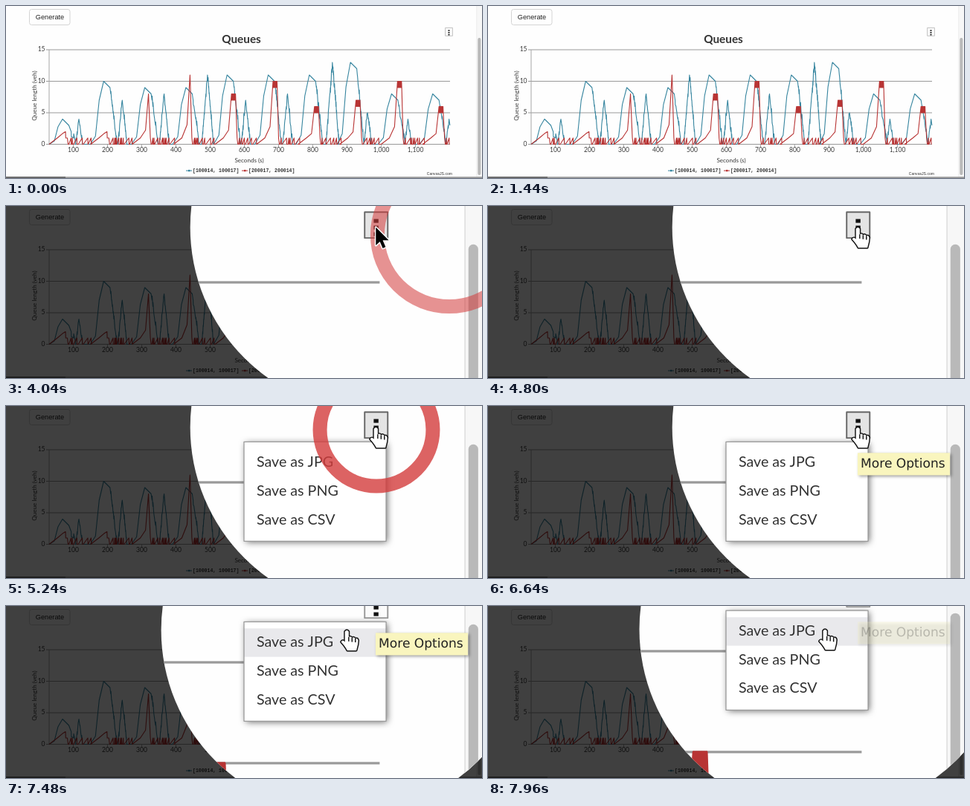
Recreate the animation shown at these times as an HTML page with a canvas. Size 640 px wide and 232 px high, loop 8000 ms.

```html
<!DOCTYPE html>
<html lang="en">
<head>
<meta charset="utf-8">
<title>Queues</title>
<style>
html, body { margin: 0; width: 100%; height: 100%; overflow: hidden; background: #fff; }
canvas { display: block; }
</style>
</head>
<body>
<canvas id="stage" width="640" height="232"></canvas>
<script>
const ctx = document.getElementById('stage').getContext('2d');
const LOOP = 8000, ZOOM = 3.2, RIGHT = 597;
const SANS = 'Lato, "Open Sans", sans-serif';
const BLUE = '#36859f', RED = '#b83434';
const clamp = v => Math.max(0, Math.min(1, v));
const smooth = p => p * p * (3 - 2 * p);
const level = v => 186.5 - v * 8.5;

let seed = 7;
const rnd = () => (seed = seed * 16807 % 2147483647) / 2147483647;

// Peak queue lengths per traffic light cycle
const crests = [4, 10, 9, 9, 11, 11, 11, 13, 8, 8];
const echoes = [4, 7, 8, 11, 7, 8, 13, 5, 4, 4];
const spikes = [2, 2, 8, 11, 8, 10, 6, 7, 10, 6];

// Uneven run from the last point to (x1, v1), one vehicle per step
function jag(points, x1, v1) {
  const [x0, v0] = points[points.length - 1], n = Math.abs(v1 - v0);
  for (let i = 1; i < n; i++) {
    const x = x0 + (x1 - x0) * i / n, v = v0 + (v1 - v0) * i / n;
    points.push([x, v], [x + .2, Math.max(0, v + rnd() * 1.6 - .8)]);
  }
  points.push([x1, v1]);
}

// Each cycle: a steep crest with a sloping shoulder, then a short jagged echo
function bluePoints() {
  const points = [];
  crests.forEach((h, i) => {
    const x = 76 + 55.3 * i, echo = echoes[i], mid = x + 18 + echo, half = 3 + echo * .45;
    points.push([x - 18, 0], [x - 11, h * .13], [x - 6, h * .7], [x, h], [x + 8.5, h - 1]);
    jag(points, x + 18, 0);
    points.push([mid - half, 0]);
    jag(points, mid, echo);
    jag(points, mid + half, 0);
  });
  return points;
}

// Each cycle: a slow ramp, a spike or flickering plateau, then small sawteeth
function redPoints() {
  const points = [];
  spikes.forEach((h, i) => {
    const x = 80 + 55.8 * i, end = i > 3 ? x + 5.5 : x + .5;
    points.push([x - 22, 0], [x - 11, 1], [x - 4, Math.max(1.7, h * .28)], [x, h]);
    for (let b = x; b < end; b += .6) points.push([b, h], [b + .3, h - 1]);
    points.push([end + 2, 1], [end + 3, 0]);
    for (let saw = end + 4; saw < x + 31;) {
      const top = saw + .5 + rnd() ** 2 * 6;
      points.push([saw, 0], [top, 1], [top + .2, 0]);
      saw = top + .4 + rnd() * 1.5;
    }
  });
  return points;
}

function toPath(points) {
  const path = new Path2D();
  points.filter(([x]) => x <= RIGHT).forEach(([x, v]) => path.lineTo(x, level(v)));
  return path;
}
const bluePath = toPath(bluePoints()), redPath = toPath(redPoints());
const arrow = new Path2D('M0 0V7.6L1.7 6 2.9 8.8 4.1 8.3 2.9 5.5H5.4Z');
const hand = new Path2D('M-.8.6Q0-.4.8.6V3Q1.6 2.4 2.2 3.3 3 2.7 3.6 3.6 4.6 3.2 4.8 4.4L4.6 6.2 4 8.6H.2Q-.6 7-2.4 5-1.8 3.8-.8 5Z');
const knuckles = new Path2D('M.8 3V4.8M2.2 3.3V5M3.6 3.6V5.2');

function box(x, y, w, h, color) {
  ctx.fillStyle = color;
  ctx.fillRect(x, y, w, h);
}
function text(str, x, y, font, align = 'center', color = '#3a3a3a') {
  ctx.font = font;
  ctx.textAlign = align;
  ctx.textBaseline = 'middle';
  ctx.fillStyle = color;
  ctx.fillText(str, x, y);
}
function stroke(path, color, width) {
  ctx.strokeStyle = color;
  ctx.lineWidth = width;
  ctx.stroke(path);
}
function rounded(x, y, w, h, r) {
  const path = new Path2D();
  path.roundRect(x, y, w, h, r);
  return path;
}
function shadowBox(x, y, w, h, color, blur, alpha) {
  ctx.save();
  ctx.shadowColor = `rgba(0,0,0,${alpha})`;
  ctx.shadowBlur = blur;
  ctx.shadowOffsetX = ctx.shadowOffsetY = 2;
  box(x, y, w, h, color);
  ctx.restore();
}

// Position along [time, x, y] keys, eased within each span
function track(t, keys) {
  let i = 0;
  while (i < keys.length - 2 && t >= keys[i + 1][0]) i++;
  const [a, b] = [keys[i], keys[i + 1]];
  const p = smooth(clamp((t - a[0]) / (b[0] - a[0])));
  return [a[1] + (b[1] - a[1]) * p, a[2] + (b[2] - a[2]) * p];
}
const cursorAt = t => track(t, [
  [1430, 500, -9.5], [1820, 527.5, 32.5], [2100, 527.5, 32.5], [2930, 594, 38],
  [3060, 595.4, 35.8], [6780, 595.4, 35.8], [7480, 583.2, 45.4], [7960, 581.6, 49.8]
]);

// Zoom about a point on the right edge, then pan down with the cursor
function viewAt(t) {
  const grow = smooth(clamp((t - 3500) / 500));
  const k = 1 + (ZOOM - 1) * grow;
  const p = clamp((t - 6800) / 1250);
  const pan = 44.5 * p * (1.25 - .25 * p);
  return { grow, k, left: 640 * (1 - k), top: 39 * (1 - k) - pan };
}

function drawLegend(label, x, color) {
  box(x, 221.6, 8, 1, color);
  box(x + 3, 220.9, 2.4, 2.4, color);
  text(label, x + 9, 222.6, 'bold 6.5px "Liberation Mono", monospace', 'left', '#333');
}

function drawChart() {
  text('Queues', 316.5, 45, `bold 15.3px ${SANS}`, 'center', '#333');
  for (let v = 0; v <= 15; v += 5) {
    box(54, level(v) - .5, 543, 1, '#999');
    text(v, 52.5, level(v) - .3, `8.5px ${SANS}`, 'right');
  }
  box(57.5, 59, 1, 128, '#a5a5a5');
  for (let v = 100; v <= 1100; v += 100) {
    const x = 44.5 + v * .46;
    box(x - .5, 187, 1, 4, '#a5a5a5');
    text(v.toLocaleString('en-US'), x, 194.7, `8.5px ${SANS}`);
  }
  text('Seconds (s)', 327, 208.2, `8.1px ${SANS}`);
  ctx.save();
  ctx.translate(39, 121);
  ctx.rotate(-Math.PI / 2);
  text('Queue length (veh)', 0, 0, `8.1px ${SANS}`);
  ctx.restore();
  ctx.lineJoin = 'round';
  stroke(bluePath, BLUE, 1.1);
  stroke(redPath, RED, 1.1);
  drawLegend('[100014, 100017]', 242, BLUE);
  drawLegend('[200017, 200014]', 317, RED);
  text('CanvasJS.com', 600, 227, '5.1px "Liberation Sans", sans-serif', 'right', '#333');
}

function drawMenu(hovered) {
  shadowBox(540, 41.9, 59.7, 41.9, '#fff', 9, .6);
  if (hovered) box(540, 44.7, 59.7, 12, '#e9e9ec');
  stroke(rounded(540, 41.9, 59.7, 41.9, 0), '#999', .4);
  ['JPG', 'PNG', 'CSV'].forEach((type, i) =>
    text('Save as ' + type, 545.3, 50.6 + i * 12.1, `6.15px ${SANS}`, 'left', '#333'));
}

function drawTooltip(alpha) {
  ctx.globalAlpha = alpha;
  shadowBox(595.3, 46.6, 38.8, 9.4, '#f9f5be', 4, .4);
  text('More Options', 596.6, 51.4, '5.34px "DejaVu Sans", sans-serif', 'left', '#222');
  ctx.globalAlpha = 1;
}

function drawScene(t) {
  box(0, 0, 640, 232, '#fefefe');
  stroke(rounded(31.5, 4.5, 54.5, 21, 3), '#d4d4d4', 1);
  text('Generate', 59, 15.3, '9.2px "Liberation Sans", sans-serif', 'center', '#222');
  drawChart();

  box(633, 0, 7, 232, '#f7f7f7');
  box(632.6, 0, .5, 232, '#dedede');
  ctx.fillStyle = '#b9b9b9';
  ctx.fill(rounded(634.3, 43, 4.1, 185, 2));
  box(0, 230.3, 640, 1.7, '#9a9a9a');
  box(0, 230.3, 80, 1.7, '#666');

  const hover = t > 2920 && t < 7000;
  box(590.7, 29.4, 9.7, 10.9, hover ? '#e4e4e4' : '#fbfbfb');
  stroke(rounded(590.7, 29.4, 9.7, 10.9, 0), hover ? '#666' : '#999', .6);
  for (let i = 0; i < 3; i++) box(594.5, 32.3 + i * 2.8, 2, 1.6, '#111');

  if (t >= 4840) drawMenu(cursorAt(t)[1] > 44.7);
  if (t >= 6640) drawTooltip(clamp(1 - (t - 7600) / 480));
}

function drawLens(t, { grow, k, left, top }) {
  const [cx, cy] = cursorAt(t);
  box(0, 0, 640, 232, `rgba(0,0,0,${.75 * grow})`);
  ctx.save();
  ctx.beginPath();
  ctx.arc(left + k * cx, top + k * cy, 78 * k, 0, 7);
  ctx.clip();
  ctx.translate(left, top);
  ctx.scale(k, k);
  drawScene(t);
  ctx.restore();
}

// Click ring that widens and fades
function drawRing(t, start, x, y) {
  const p = (t - start) / 720;
  if (p <= 0 || p >= 1) return;
  const path = new Path2D(), r = 124 * p;
  path.arc(x, y, r, 0, 7);
  ctx.globalAlpha = Math.min(.8, (1 - p) * 2.5);
  stroke(path, 'rgb(212,60,60)', Math.min(19, 2 * r));
  ctx.globalAlpha = 1;
}

function drawCursor(t, { k, left, top }) {
  const pointer = t >= 4800, shape = pointer ? hand : arrow;
  ctx.save();
  ctx.translate(left, top);
  ctx.scale(k, k);
  ctx.translate(...cursorAt(t));
  ctx.lineJoin = 'round';
  stroke(shape, pointer ? '#111' : '#fff', .9);
  ctx.fillStyle = pointer ? '#fff' : '#000';
  ctx.fill(shape);
  if (pointer) stroke(knuckles, '#111', .45);
  ctx.restore();
}

function frame(now) {
  const t = now % LOOP, view = viewAt(t);
  drawScene(t);
  if (view.grow) drawLens(t, view);
  drawRing(t, 3480, 596, 39);
  drawRing(t, 4800, 498, 32);
  drawCursor(t, view);
  requestAnimationFrame(frame);
}
requestAnimationFrame(frame);
</script>
</body>
</html>
```
